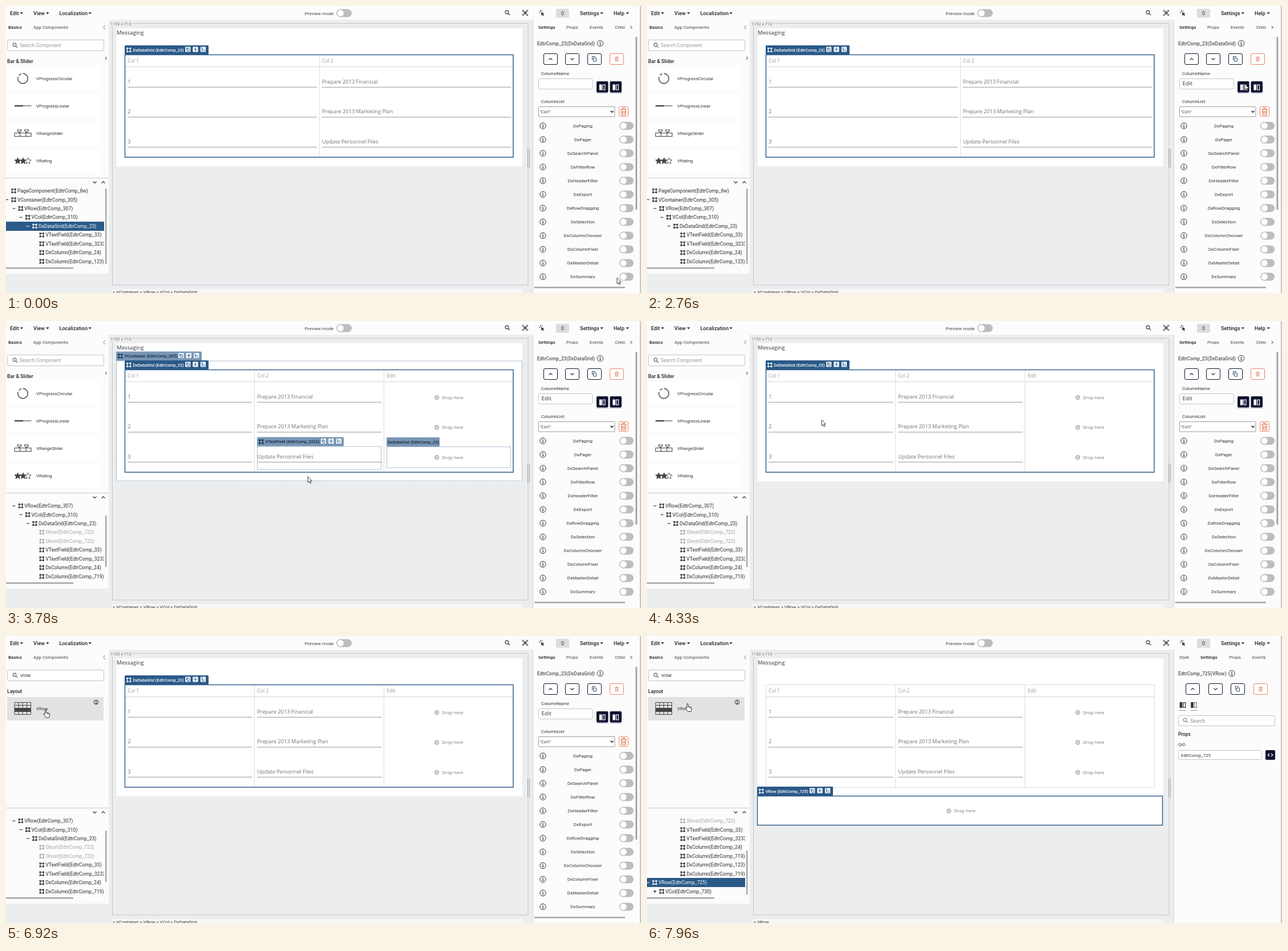
Recreate the animation shown at these times as an HTML page. Size 1113 by 503 pixels, loop 8000 ms.

```html
<!DOCTYPE html>
<html lang="en">
<head>
<meta charset="utf-8">
<title>Page editor</title>
<style>
html, body { margin: 0; width: 100%; height: 100%; overflow: hidden; background: #ebedef; }
#stage { display: block; width: 100vw; height: 100vh; }
text { font-family: Roboto, sans-serif; white-space: pre; }
.s { font-family: "Open Sans", "Noto Sans", sans-serif; }
.b { font-weight: 500; }
.m { text-anchor: middle; }
</style>
</head>
<body>
<svg id="stage" viewBox="0 0 1113 503"></svg>
<script>
const LOOP = 8000;
const BLUE = '#2a5a88', PALE = '#7896b5', INK = '#333', NAVY = '#10132f', RED = '#e8836b', EDGE = '#c4c4c4', BACK = '#ebedef';

// Drawing helpers; text y is the middle of the capitals.
const rect = (x, y, w, h, fill, more = '') =>
  `<rect x="${x}" y="${y}" width="${w}" height="${h}" fill="${fill}" ${more}/>`;
const box = (x, y, w, h, stroke, more = '', fill = 'none') =>
  rect(x, y, w, h, fill, `stroke="${stroke}" ${more}`);
const path = (d, stroke = INK, w = 1, fill = 'none') =>
  `<path d="${d}" stroke="${stroke}" stroke-width="${w}" fill="${fill}"/>`;
const dot = (x, y, r, fill, more = '') => `<circle cx="${x}" cy="${y}" r="${r}" fill="${fill}" ${more}/>`;
const text = (x, y, str, size = 8, fill = INK, cls = '') =>
  `<text x="${x}" y="${(y + size * .355).toFixed(2)}" font-size="${size}" fill="${fill}" class="${cls}">${str}</text>`;
const group = (id, body) => `<g id="${id}">${body}</g>`;
const at = (x, y, body) => `<g transform="translate(${x} ${y})">${body}</g>`;
const clip = (x, y, w, h, body) =>
  `<svg x="${x}" y="${y}" width="${w}" height="${h}" viewBox="${x} ${y} ${w} ${h}">${body}</svg>`;
const named = (name, id, gap = '') => `${name}${gap}(EdtrComp_${id})`;

// Small icons
const nodeIcon = (x, y, c) => at(x, y, path('M-2.7-2.7h5.4v5.4h-5.4z', c, 1.1) +
  [[-1, -1], [1, -1], [-1, 1], [1, 1]].map(([a, b]) => rect(a * 2.9 - 1.2, b * 2.9 - 1.2, 2.4, 2.4, c)).join(''));
const info = (x, y, r = 5.2) => dot(x, y, r, 'none', `stroke="${INK}" stroke-width="1"`) +
  at(x, y, path('M-1-.7h1.2v3M-1.3 2.4h2.8', INK, 1) + dot(0, -2.3, .8, INK));
const lens = (x, y, c) => dot(x - 1, y - 1, 2.9, 'none', `stroke="${c}" stroke-width="1.1"`) +
  path(`M${x + 1} ${y + 1}l3.2 3.2`, c, 1.2);
const toggle = (x, y, w = 25) => rect(x, y - 7, w, 14, '#bdbdbd', 'rx="7"') + dot(x + 7.2, y, 5.6, '#fff');
const menu = (x, str, arrow) => text(x, 12.5, str, 9.1, '#222', 'b') +
  path(`M${arrow} 11.3h5.6l-2.8 3z`, 'none', 0, '#222');
const dropHere = (x, y) => dot(x, y, 3.4, 'none', 'stroke="#666" stroke-width=".9"') +
  path(`M${x - 1.7} ${y - .8}h3.4l-1.7 2.1z`, 'none', 0, '#666') + text(x + 9, y, 'Drop here', 8, '#757575', 's');
const chevron = (x, y, up, c = INK, w = 1.2) => path(`M${x - 3} ${y + up * 1.5}l3 ${-up * 3}l3 ${up * 3}`, c, w);
const copyIcon = (x, y, c) => box(x - 2, y - 2, 5, 6, c, 'rx=".5"') + path(`M${x - 4} ${y + 1.5}v-6h5.4`, c, 1);
const trash = (x, y, k = 1) => at(x, y, `<g transform="scale(${k})">` +
  path('M-4-3h8M-1.4-3v-1.5h2.8v1.5M-3-3l.5 7.5h5l.5-7.5M-1-1v3.7M1-1v3.7', RED, 1.1) + '</g>');
const columnsIcon = (x, y, c, dash = '') => rect(x - 5.3, y - 5, 4.6, 10, c) +
  box(x + 1, y - 4.4, 3.8, 8.8, c, `stroke-width="1.2" stroke-dasharray="${dash}"`);

// Element label with its three tools
function tag(x, y, w, str, strong, toolX) {
  const ink = strong ? '#fff' : '#14283c';
  const tools = toolX ? [0, 13.3, 26.8].map((d, i) => at(toolX + d, y + 7, rect(-4.6, -4.6, 9.2, 9.2, '#fff', 'rx="1"') +
    path(['M-1-1h3.5v4h-3.5zM-2.5 1.5v-4h3.5', 'M-3 0h6M0-3v6M-1-2l1-1 1 1M-1 2l1 1 1-1', 'M-3-2.5h2.5M-2 -2.5v5h2M-2 0h2M.5 0h2.5M.5 2.5h2.5'][i], BLUE, .9))).join('') : '';
  return rect(x, y, w, 16, strong ? BLUE : PALE, 'rx="1.5"') +
    (toolX ? nodeIcon(x + 7.3, y + 8, ink) : '') + text(x + (toolX ? 14.4 : 2.5), y + 8, str, 7.4, ink, 'b') + tools;
}
const dashed = (x, y, w, h) => box(x + .5, y + .5, w, h, PALE, 'stroke-dasharray="2 1.5"');

function grid(cols, open) {
  const step = 681 / cols.length, tail = open ? 265 : 107;
  let out = box(208.5, 85.5, 681, open ? 180 : 82.5, '#dcdcdc') + path('M208.5 106.5h681', '#d8d8d8');
  cols.forEach((name, i) => {
    const x = 208.5 + step * i;
    if (i) out += path(`M${Math.floor(x) + .5} 85.5V${tail}`, '#dcdcdc');
    out += text(x + 4.8, 96.3, name, 8.6, '#999', 's');
    if (!open) return;
    ['Prepare 2013 Financial', 'Prepare 2013 Marketing Plan', 'Update Personnel Files'].forEach((task, r) => {
      const y = 132.3 + r * 52.5;
      if (i === 2) out += dropHere(755, y + 1.7);
      else out += text(x + 4.8, y, i ? task : r + 1, 9.24, '#727272', 's') +
        path(`M${x + 4.5} ${y + 10}H${x + step - 4}`, '#8c8c8c', .9);
    });
  });
  return out;
}

// Tree rows are written as depth, marker, name and id.
function tree(rows, picked, thumbY, thumbH) {
  return clip(0, 315, 172, 142, rows.map((row, i) => {
    const [name, id] = row.slice(2).split(' ');
    const x = 20 + 12.3 * row[0], y = 324 + 15.45 * i, on = i === picked;
    const c = on ? '#fff' : name === 'Ghost' ? '#a5a5a5' : '#2b2b2b';
    const mark = row[1] === ' ' ? '' : path(`M${x - 21} ${y}h5` + (row[1] === '+' ? 'm-2.5-2.5v5' : ''), c, 1.1);
    return (on ? rect(0, Math.round(y - 8), 172, 16, BLUE) : '') + mark + nodeIcon(x - 6.5, y, c) +
      text(x, y, named(name, id), 8.64, c);
  }).join('')) + rect(174, thumbY, 2.5, thumbH, '#a8a8a8');
}

function vrow(y) {
  return box(193.5, y + .5, 710, 51, BLUE, 'stroke-width="1.4"', '#fff') + dropHere(529, y + 26.5);
}

function actionButtons(x, gap) {
  return [0, 1, 2, 3].map(i => {
    const left = Math.floor(x + gap * i) + .5, mid = left + 12;
    return box(left, 83.5, 24, 19, i === 3 ? RED : NAVY, 'rx="2.5"', '#fff') +
      [chevron(mid, 93, 1), chevron(mid, 93, -1), copyIcon(mid, 93, '#28435f'), trash(mid, 93, .85)][i];
  }).join('');
}

function gridSettings() {
  const names = ['Paging', 'Pager', 'SearchPanel', 'FilterRow', 'HeaderFilter', 'Export', 'RowDragging', 'Selection',
    'ColumnChooser', 'ColumnFixer', 'MasterDetail', 'Summary'];
  const pair = [1035, 1058.5].map(x => rect(x, 132, 20.5, 19.5, NAVY, 'rx="2"') + columnsIcon(x + 10.2, 142.5, '#fff') +
    path(`M${x} 152.5h20.5`, '#8b8fae', .8)).join('');
  return text(933, 37.5, 'Settings', 8, '#222', 'b') + text(982, 37.5, 'Props', 8, '#444') + text(1023, 37.5, 'Events', 8, '#444') +
    clip(1060, 30, 24.5, 16, text(1067.5, 37.5, 'Child', 8, '#444')) + path('M1094.5 35.2l3 2.2l-3 2.2') +
    text(931, 65.5, 'EdtrComp_23(DxDataGrid)', 8.55, '#555', 'b') + info(1041.5, 65.5) +
    actionButtons(942.2, 38.7) + text(938, 118, 'ColumnName') + box(933.5, 127.5, 94.5, 18, EDGE, 'rx="2"', '#fff') + pair +
    text(938, 167, 'ColumnList') + box(933.5, 176.5, 133.5, 17.5, '#999', 'rx="1"', '#fff') +
    text(936, 185, "'Col1'", 7.7, '#222', 's') + path('M1059.5 183.7l2.6 2.6l2.6-2.6', '#222', 1.4) +
    box(1074.5, 176.5, 16, 17, RED, 'rx="2"') + trash(1082.5, 185, 1.3) +
    names.map((n, i) => {
      const y = 210 + 24.05 * i;
      return info(941, y) + text(1011, y, 'Dx' + n, 8, INK, 'm') + toggle(1075, y);
    }).join('') + rect(1103.5, 54, 2.8, 303, '#a0a0a0', 'rx="1"') + rect(926, 492, 159, 2.6, '#a8a8a8');
}

function rowSettings() {
  return text(933, 37.5, 'Style', 8, '#444') + text(970, 37.5, 'Settings', 8, '#222', 'b') + text(1020, 37.5, 'Props', 8, '#444') +
    text(1061, 37.5, 'Events', 8, '#444') + text(931, 65.5, 'EdtrComp_725(VRow)', 8.55, '#555', 'b') + info(1025, 65.5) +
    actionButtons(944.3, 39.8) + columnsIcon(939, 121, INK) + columnsIcon(958.5, 121, INK, '1.5 1') +
    path('M933 130.5h11.5M953 130.5h11.5', '#777', .8) +
    box(931.5, 139.5, 169, 18, EDGE, 'rx="2"', '#fff') + lens(944, 148, '#888') + text(952, 148.5, 'Search', 8.5, '#888') +
    text(931, 172, 'Props', 8.3, '#222', 'b') + text(931, 190.5, 'QID') +
    box(931.5, 200.5, 146, 16, EDGE, 'rx="2"', '#fff') + text(936, 208.7, 'EdtrComp_725', 7.9) +
    rect(1084, 200, 17, 17, NAVY, 'rx="2"') + path('M1091 206l-3 2.5 3 2.5M1094 206l3 2.5-3 2.5', '#fff', 1.1);
}

function components() {
  const star = (x, fill) => at(x, 271.5, path('M0-5.6L1.6-1.9 5.6-1.6 2.5 1 3.5 4.9 0 2.8-3.5 4.9-2.5 1-5.6-1.6-1.6-1.9z', '#444', .9, fill));
  const art = `<circle cx="29.5" cy="127" r="8.7" fill="none" stroke="#444" stroke-width="1.4" stroke-dasharray="30 3 5 3"/>` +
    path('M15 175h15', '#444', 2.4) + path('M30 175h14.5', '#999', 2) +
    path('M15 222.5h29v6H15zM24.5 222.5v6M35 222.5v6', '#444', 1.1) +
    [23.5, 36].map(x => path(`M${x - 3.3} 217h6.6v1.7l-3.3 3.3l-3.3-3.3z`, '#444', 1.1)).join('') +
    star(20.5, '#444') + star(30, '#444') + star(38.5, '#fff');
  return text(2, 96.5, 'Bar &amp; Slider', 8.7, '#222', 'b') +
    ['VProgressCircular', 'VProgressLinear', 'VRangeSlider', 'VRating'].map((n, i) =>
      rect(2, 107 + 48.1 * i, 162, 41, '#fff') + text(53, 127.3 + 48.1 * i, n, 7.9)).join('') +
    art + rect(174, 89, 2.5, 5, '#a0a0a0');
}

function rowComponent() {
  return text(2, 96.5, 'Layout', 8.7, '#222', 'b') + group('card', rect(2, 107, 162, 41, '#fff')) +
    group('cardHover', rect(2, 107, 169, 41, '#e2e2e2') + info(158, 116, 3.8)) +
    path('M15 116.5h28.5v21H15zM22.1 116.5v21M29.2 116.5v21M36.4 116.5v21M15 121.5h28.5', '#444', 1) +
    rect(15, 126, 28.5, 7, '#444') + text(53, 127.3, 'VRow', 7.9);
}

const topBar = rect(0, 0, 1113, 24, '#fcfcfc') + menu(7, 'Edit', 24.5) + menu(48, 'View', 70) + menu(93.5, 'Localization', 144.3) +
  text(523.5, 12.7, 'Preview mode', 8.1, '#444') + toggle(579, 12.5, 27) + lens(879, 12, INK) +
  path('M905.5 10v-2.5h2.5M912 7.5h2.5v2.5M914.5 14v2.5h-2.5M908 16.5h-2.5v-2.5M908 10h4v4h-4zM907 9l6 6M913 9l-6 6', INK, 1) +
  path('M938 11l5 2.2-2.2.8 2 2.3-1 .8-2-2.3-1 2z', INK, .5, INK) + path('M937.5 7v2.5M934 11.5h2M935.3 8.2l1.5 1.6M940.5 8l-1 1.5', INK, 1) +
  rect(964, 5, 23, 15.5, '#dcdcdc', 'rx="2"') + text(975.5, 12.7, '0', 9, INK, 'm') + menu(1006, 'Settings', 1041.5) + menu(1065, 'Help', 1086.5);

const leftPanel = rect(0, 24, 180, 445, '#fcfcfc') + text(4, 37.5, 'Basics', 8, '#222', 'b') + text(48, 37.5, 'App Components', 7.9, '#444') +
  path('M174 34l-3.5 3.5l3.5 3.5', '#777') + box(2.5, 59.5, 169, 19, EDGE, 'rx="2.5"', '#fff') + lens(16, 69, '#666') +
  group('hint', text(24, 69.3, 'Search Component', 8.5, '#999')) + `<text id="query" x="25" y="72.3" font-size="8.5" fill="${INK}"></text>` +
  group('queryCaret', rect(0, 64, 1, 11, '#111')) +
  clip(0, 84, 180, 216, group('listAll', components()) + group('listRow', rowComponent())) +
  path('M0 301.5h180', '#c9c9c9') + chevron(155.5, 309, -1) + chevron(170.5, 309, 1);

const inner = ['0 PageComponent 8w', '0-VContainer 305', '1-VRow 307', '2-VCol 310', '3-DxDataGrid 23'];
const fields = ['4 VTextField 33', '4 VTextField 3233', '4 DxColumn 24'];
const firstRows = [...inner, ...fields, '4 DxColumn 123'];
const trees = group('treePicked', tree(firstRows, 4, 320, 132)) + group('treeFirst', tree(firstRows, -1, 320, 132)) +
  group('treeNew', tree([...inner.slice(2), '4 Ghost 722', '4 Ghost 722', ...fields, '4 DxColumn 719'], -1, 341, 90)) +
  group('treeRow', tree(['4 Ghost 722', ...fields, '4 DxColumn 719', '4 DxColumn 123', '4 DxColumn 719', '0-VRow 725', '1+VCol 730'], 7, 376, 77)) +
  rect(0, 458, 118, 2.6, '#a8a8a8');

const three = ['Col 1', 'Col 2', 'Edit'];
const page = h => rect(194, 39, 711, h, '#fff') + text(194, 46.7, 'Messaging', 9.65, '#333', 's');
const canvas = rect(0, 24, 924, 479, BACK) + box(186.5, 30.5, 728.5, 458.5, '#c3c5c7') + rect(182, 25, 40, 11, BACK) +
  text(183, 31, '1152 x 713', 7.4, '#777') +
  group('pageTwo', page(242) + grid(['Col 1', 'Col 2'], true)) + group('pageShort', page(144) + grid(three, false)) +
  group('pageThree', page(242) + grid(three, true)) +
  group('hoverBox', dashed(193, 69.5, 711, 210) + tag(193, 53.5, 150, named('VContainer', 305, ' '), false, 307)) +
  group('hoverCell', dashed(667, 220, 217, 36.5) + tag(667, 204, 93, named('DxDataGrid', 23, ' '), false) +
    dashed(440, 219.5, 217, 40) + tag(440, 203.5, 152, named('VTextField', 3233, ' '), false, 556.5)) +
  group('picked', box(208.5, 85.5, 680.5, 179.5, BLUE, 'stroke-width="1.4"') + tag(208, 69, 147, named('DxDataGrid', 23, ' '), true, 318.7)) +
  group('rowHigh', vrow(183) + tag(193, 167, 133, named('VRow', 725, ' '), true, 289.7)) +
  group('rowLow', vrow(280) + tag(193, 264, 133, named('VRow', 725, ' '), true, 289.7)) +
  rect(186, 496, 720, 7, '#f6f6f6') + group('crumbsGrid', text(187, 501.4, '> VContainer > VRow > VCol > DxDataGrid')) +
  group('crumbsRow', text(187, 501.4, '> VRow')) + path('M914.5 250v33M917.5 250v33', '#a2a2a2', 1);

const rightPanel = rect(923.5, 24, 189.5, 479, '#fcfcfc') + path('M923.5 24v479', '#d5d5d5') + path('M1111.8 0v503', '#b8b8b8', 1.6) +
  group('gridPanel', gridSettings() + `<text id="name" class="s" x="938.5" y="139.3" font-size="9.8" fill="${INK}"></text>` +
    group('nameCaret', rect(0, 130.5, 1, 11.5, '#111')) +
    group('tip', clip(1079, 133, 22, 44, rect(1079, 133, 40, 44, '#5e5e5e', 'rx="2"') +
      ['Add', 'Dropable', 'Column'].map((s, i) => text(1098, 141.5 + 13 * i, s, 8, '#fff', 'm')).join('')))) +
  group('rowPanel', rowSettings());

const cursors = group('cursor',
  group('arrow', path('M0 0v10.5l2.4-2.2 1.6 3.6 1.6-.7-1.6-3.5h3.3z', '#111', .8, '#fff')) +
  group('beam', path('M-3-5.3h2l1 .8 1-.8h2M0-4.5v9M-3 5.3h2l1-.8 1 .8h2', '#111', 1)) +
  group('hand', path('M-1 1a1.1 1.1 0 0 1 2.2 0v4.2l4.3 1q1.5.4 1.5 2v2.5q0 2-1.2 3.3h-5q-1.5-1.6-3.8-5.1q-.9-1.8.3-2.2q.8-.1 1.7 1.3z', '#111', .9, '#fff') +
    path('M3 5.8v2.4M5 6.4v2', '#111', .7)));

const $ = id => document.getElementById(id);
$('stage').innerHTML = canvas + topBar + leftPanel + trees + rightPanel + cursors;

const show = (id, on) => { $(id).style.display = on ? '' : 'none'; };
const during = (t, a, b = LOOP) => t >= a && t < b;
const stepped = (t, a, b, n) => t < a ? 0 : Math.min(1, (Math.floor((t - a) / (b - a) * (n - 1) + .001) + 1) / n);
const smooth = p => p * p * (3 - 2 * p);

// Pointer trips: start, end, steps, x, y, shape on arrival
const trips = [
  [70, 480, 7, 984, 141, 'beam'], [2220, 2970, 12, 1070, 135, 'hand'], [3510, 3780, 5, 529, 272.5, 'arrow'],
  [3990, 4670, 10, 83.5, 74, 'beam'], [6480, 6920, 7, 69.5, 129, 'hand'], [7840, 7960, 3, 71, 118.5, 'hand']
];
function pointer(t) {
  let x = 1071, y = 476.5, shape = 'arrow';
  for (const [a, b, n, tx, ty, kind] of trips) {
    const p = stepped(t, a, b, n), e = smooth(p);
    if (!p) break;
    x += (tx - x) * e;
    y += (ty - y) * e;
    shape = p === 1 || shape === kind ? kind : 'arrow';
  }
  return { x, y, shape };
}

// Keystroke times give the number of typed letters.
const typed = (word, times, t) => word.slice(0, times.filter(k => t >= k).length);
function field(id, word, caretOn, x) {
  const el = $(id);
  if (el.textContent !== word) el.textContent = word;
  show(id + 'Caret', caretOn);
  if (caretOn) $(id + 'Caret').setAttribute('transform', `translate(${x + (word ? el.getComputedTextLength() : 0)} 0)`);
}

function draw(t) {
  const { x, y, shape } = pointer(t);
  $('cursor').setAttribute('transform', `translate(${x} ${y})`);
  ['arrow', 'beam', 'hand'].forEach(s => show(s, s === shape));

  show('treePicked', t < 680);
  show('treeFirst', during(t, 680, 3580));
  show('treeNew', during(t, 3580, 7250));
  show('treeRow', t >= 7250);

  show('pageTwo', t < 3440);
  show('pageShort', during(t, 3440, 3580) || during(t, 7180, 7450));
  show('pageThree', during(t, 3580, 7180) || t >= 7450);
  show('picked', t < 3440 || during(t, 3580, 7180));
  show('hoverCell', during(t, 3710, 3850));
  show('hoverBox', during(t, 3780, 4200));
  show('rowHigh', during(t, 7250, 7450));
  show('rowLow', t >= 7450);

  const rowMode = t >= 7250;
  show('gridPanel', !rowMode);
  show('rowPanel', rowMode);
  show('crumbsGrid', !rowMode);
  show('crumbsRow', rowMode);
  show('tip', during(t, 2830, 3510));

  const nameCaret = during(t, 750, 2270) || during(t, 2790, 3230);
  field('name', typed('Edit', [1220, 1280, 1540, 1740], t), nameCaret && !rowMode, t < 1220 ? 936 : 938);
  field('query', typed('vrow', [5610, 5810, 5880, 6080], t), during(t, 4810, 5340) || during(t, 5610, 6480), 25);
  show('hint', t < 5610);
  show('listAll', t < 5880);
  show('listRow', t >= 5880);
  const hover = t >= 6480 && y > 107;
  show('card', !hover);
  show('cardHover', hover);
}

const start = performance.now();
function tick(now) {
  draw(Math.max(0, now - start) % LOOP);
  requestAnimationFrame(tick);
}
draw(0);
requestAnimationFrame(tick);
</script>
</body>
</html>
```
